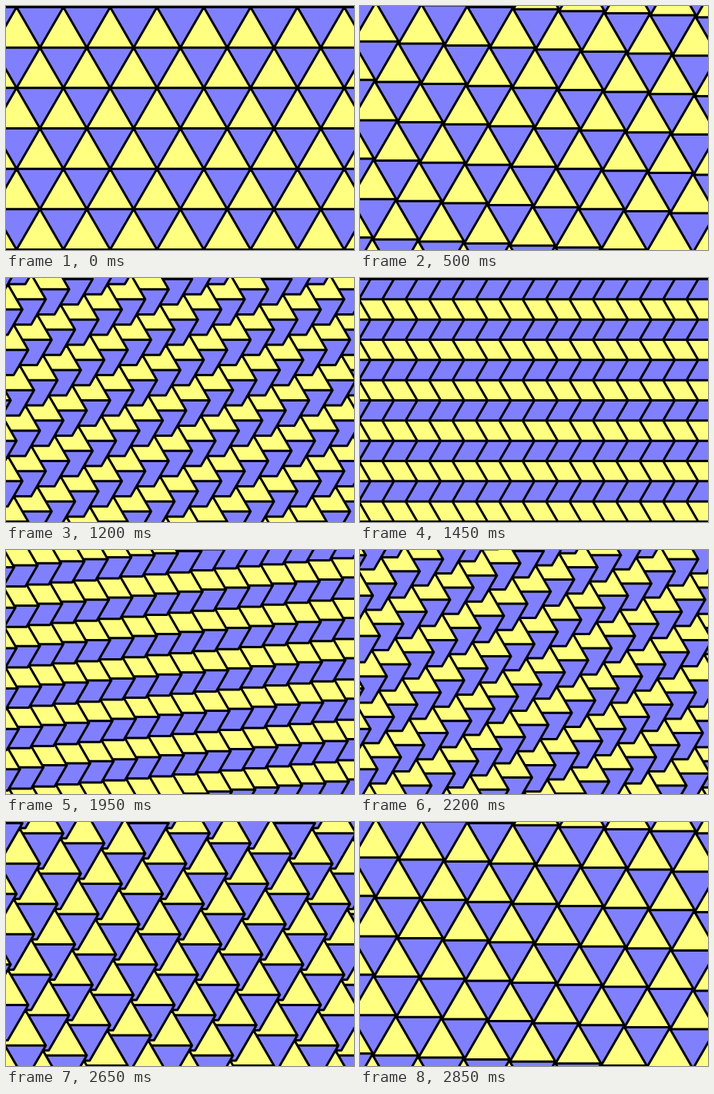
An HTML page with a canvas for the animation above (2.9 s loop, 452 by 318 pixels).

```html
<!DOCTYPE html>
<html lang="en">
<head>
<meta charset="utf-8">
<title>Triangles to chevrons</title>
<style>
  html, body { margin: 0; width: 100%; height: 100%; overflow: hidden; background: #fff; }
  canvas { display: block; }
</style>
</head>
<body>
<canvas id="stage" width="452" height="318"></canvas>
<script>
const ctx = document.getElementById("stage").getContext("2d");
const SIDE = 60.8;
const HEIGHT = SIDE * Math.sqrt(3) / 2;
const CENTER = [226.5, 159.5];
const STEPS = 20, STEP_MS = 50, HOLD_MS = 500, LOOP_MS = 2900;

// Tile corners around a shared anchor: the left end of the yellow base.
// x is in sides, y in triangle heights.
function yellowTile(t) {
  const w = 1 - t / 2;
  return [[0, 0], [w, 0], [w / 2, -w], [t / 4, -t / 2], [-t / 4, -t / 2]];
}

function blueTile(t) {
  const w = 1 - t / 2;
  return [[0, 0], [w, 0], [w / 2, w], [w / 2 - t / 2, w], [(1 - t) / 2, 1 - t]];
}

function tilePath(corners, t) {
  const path = new Path2D();
  for (let i = -11; i <= 11; i++) {
    for (let j = -15; j <= 15; j++) {
      const x = i * (1 - t / 2) + j * (1 - t) / 2;
      const y = i * t + j;
      const px = CENTER[0] + x * SIDE, py = CENTER[1] + y * HEIGHT;
      if (px < -90 || px > 542 || py < -90 || py > 408) continue;
      corners.forEach(([cx, cy], n) => {
        path[n ? "lineTo" : "moveTo"](px + cx * SIDE, py + cy * HEIGHT);
      });
      path.closePath();
    }
  }
  return path;
}

function draw(t) {
  const yellow = tilePath(yellowTile(t), t);
  const blue = tilePath(blueTile(t), t);
  ctx.fillStyle = "#8080ff";
  ctx.fillRect(0, 0, 452, 318);
  ctx.fillStyle = "#ffff80";
  ctx.fill(yellow);
  yellow.addPath(blue);
  ctx.strokeStyle = "#000";
  ctx.lineWidth = 3;
  ctx.lineJoin = "round";
  ctx.stroke(yellow);
}

function stepAt(ms) {
  const turn = LOOP_MS / 2;
  const part = ms % turn;
  const moved = part < HOLD_MS ? 0 : 1 + Math.floor((part - HOLD_MS) / STEP_MS);
  return ms < turn ? moved : STEPS - moved;
}

const start = performance.now();
let shown = -1;

function tick() {
  const step = stepAt((performance.now() - start) % LOOP_MS);
  if (step !== shown) {
    draw(step / STEPS);
    shown = step;
  }
  requestAnimationFrame(tick);
}
tick();
</script>
</body>
</html>
```
